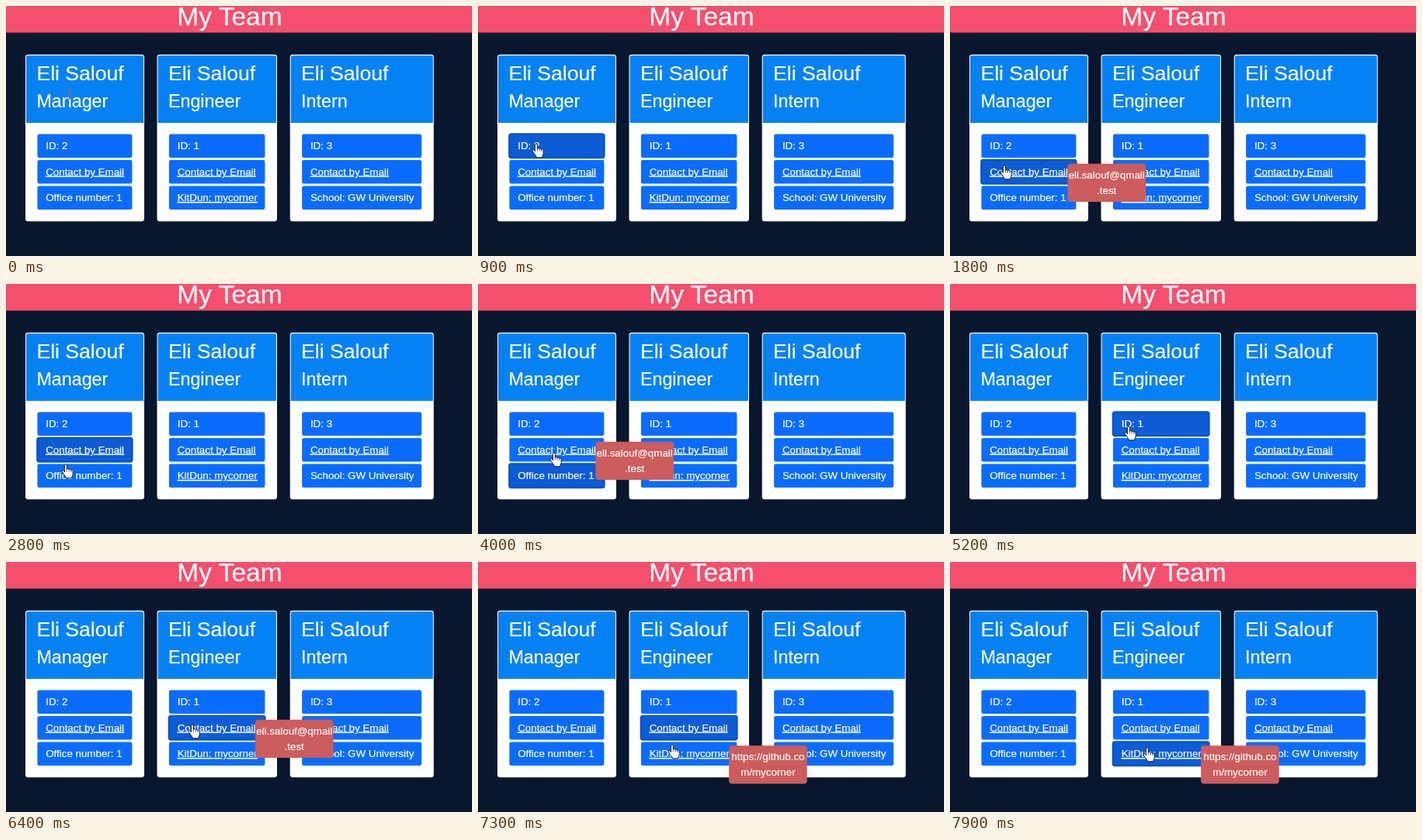
An HTML page for the animation above (8000 ms loop, 600 by 323 pixels).

```html
<!DOCTYPE html>
<html lang="en">
<head>
<meta charset="utf-8">
<title>My Team</title>
<style>
  html, body { margin: 0; width: 100%; height: 100%; overflow: hidden; background: #08172e; }
  svg { display: block; width: 600px; height: 323px; }
  text { font: 13.35px "Liberation Sans", Arial, sans-serif; fill: #fff; stroke: #fff; stroke-width: .2; }
  .title { font-size: 33.5px; text-anchor: middle; }
  .name { font-size: 26.6px; }
  .role { font-size: 23.3px; }
  .link { text-decoration: underline; }
  .row rect { fill: #0a6cfe; }
  .row.hover rect { fill: #0b5cd6; stroke: #0a54c6; stroke-width: 2.5; }
  .tip text { text-anchor: middle; }
  .tip rect { fill: #cd5c5c; }
</style>
</head>
<body>
<svg id="stage" viewBox="0 0 600 323">
  <rect width="600" height="323" fill="#08172e"/>
  <rect width="600" height="34.4" fill="#f4506e"/>
  <text class="title" x="288" y="25.3">My Team</text>
  <g id="cards"></g>
  <g id="tips"></g>
  <g id="cursor">
    <path id="beam" d="M-3-6h2l1 1 1-1h2M0-5V6M-3 7h2l1-1 1 1h2" fill="none" stroke="#96705c" stroke-width="1.2"/>
    <path id="arrow" d="M0 0V14.5L3.4 11.4 5.8 16.8 8 15.8 5.6 10.6H10.2Z" fill="#fff" stroke="#111" stroke-width=".9"/>
    <g id="hand">
      <path d="M-1.6 1.2C-1.6-.5 1.3-.5 1.3 1.2V6.3C1.6 5.2 4 5.3 4.1 6.8 4.6 5.8 6.7 6 6.8 7.5 7.5 6.7 9.2 7.2 9.2 8.7V12.8C9.2 14.6 7.6 15.6 7.6 17.8H.2C.2 15.6-1.4 14.8-2.6 12.7L-4.8 9.3C-5.5 8-3.6 7-2.7 8.2L-1.6 9.7Z"
        fill="#fff" stroke="#111" stroke-width=".95" stroke-linejoin="round"/>
      <path d="M1.3 6.3V9.5M4.1 6.8V9.7M6.8 7.5V10" stroke="#111" stroke-width=".7"/>
    </g>
  </g>
</svg>
<script>
const LOOP = 8000;
const NAME = "Eli Salouf";
const MAIL = ["eli.salouf@qmail", ".test"];
const REPO = ["https://github.co", "m/mycorner"];
const get = id => document.getElementById(id);

function add(parent, tag, attrs, label) {
  const node = document.createElementNS("http://www.w3.org/2000/svg", tag);
  for (const key in attrs) node.setAttribute(key, attrs[key]);
  if (label) node.textContent = label;
  return parent.appendChild(node);
}

const cards = [
  { x: 25, w: 153, role: "Manager", id: 2, last: "Office number: 1" },
  { x: 194.5, w: 154.5, role: "Engineer", id: 1, last: "KitDun: mycorner", url: REPO },
  { x: 365.7, w: 185, role: "Intern", id: 3, last: "School: GW University" }
];
const rows = [];

function addTip(x, y, lines) {
  const tip = add(get("tips"), "g", { class: "tip" });
  add(tip, "rect", { x, y, width: 100.6, height: 49.2, rx: 4 });
  lines.forEach((line, i) => add(tip, "text", { x: x + 50.3, y: y + 19.1 + i * 20 }, line));
  return tip;
}

function addRow(card, i, label, tipLines) {
  const x = card.x + 15.4, y = 165.6 + i * 33.4, w = card.w - 31, h = 30.5;
  const node = add(get("cards"), "g", { class: "row" });
  add(node, "rect", { x, y, width: w, height: h, rx: 2.5 });
  add(node, "text", { x: x + 10.8, y: y + 19.6, class: tipLines ? "link" : "" }, label);
  const tip = tipLines && addTip(x + (i === 1 ? 111 : 113.2), y + 4.8, tipLines);
  rows.push({ x, y, w, h, node, tip });
}

for (const card of cards) {
  const { x, w } = card, group = get("cards");
  add(group, "rect", { x, y: 62.8, width: w, height: 215.4, rx: 3.4, fill: "#fff" });
  add(group, "path", {
    d: `M${x + 1} 151V66.6q0-2.6 2.6-2.6H${x + w - 3.6}q2.6 0 2.6 2.6V151Z`, fill: "#0482f3"
  });
  add(group, "text", { x: x + 14.4, y: 95.6, class: "name" }, NAME);
  add(group, "text", { x: x + 14.4, y: 131, class: "role" }, card.role);
  addRow(card, 0, "ID: " + card.id);
  addRow(card, 1, "Contact by Email", MAIL);
  addRow(card, 2, card.last, card.url);
}

// Pointer path: time, x, y
const path = [
  [0, 82, 113], [600, 80, 150], [900, 75, 178], [1300, 70, 200], [1800, 70, 206],
  [2300, 72, 210], [2700, 76, 226], [2800, 77, 233], [3300, 90, 245], [3900, 98, 234],
  [4000, 98, 218], [4400, 104, 210], [4800, 160, 186], [5000, 214, 182], [5200, 230, 184],
  [5900, 232, 188], [6400, 240, 210], [6900, 240, 210], [7300, 250, 236], [7900, 254, 240]
];

function pointAt(t) {
  const i = path.findIndex(p => p[0] >= t);
  if (i < 0) return path[path.length - 1].slice(1);
  if (i === 0) return path[0].slice(1);
  const [t0, x0, y0] = path[i - 1], [t1, x1, y1] = path[i];
  const k = (t - t0) / (t1 - t0);
  return [x0 + (x1 - x0) * k, y0 + (y1 - y0) * k];
}

const inside = (r, [x, y]) => x >= r.x && x <= r.x + r.w && y >= r.y && y <= r.y + r.h;
const show = (node, on) => node.setAttribute("visibility", on ? "visible" : "hidden");

function draw(now) {
  const t = Math.floor(now % LOOP / 100) * 100;
  const point = pointAt(t), before = pointAt(Math.max(0, t - 100));
  let over = false;
  for (const row of rows) {
    const hit = inside(row, point);
    over = over || hit;
    // The highlight trails the pointer by one step.
    row.node.classList.toggle("hover", inside(row, before));
    if (row.tip) show(row.tip, hit);
  }
  const onText = point[1] < 138;
  show(get("hand"), over);
  show(get("beam"), !over && onText);
  show(get("arrow"), !over && !onText);
  get("cursor").setAttribute("transform", `translate(${point})`);
}

const start = performance.now();
function tick() {
  draw(performance.now() - start);
  requestAnimationFrame(tick);
}
tick();
</script>
</body>
</html>
```
